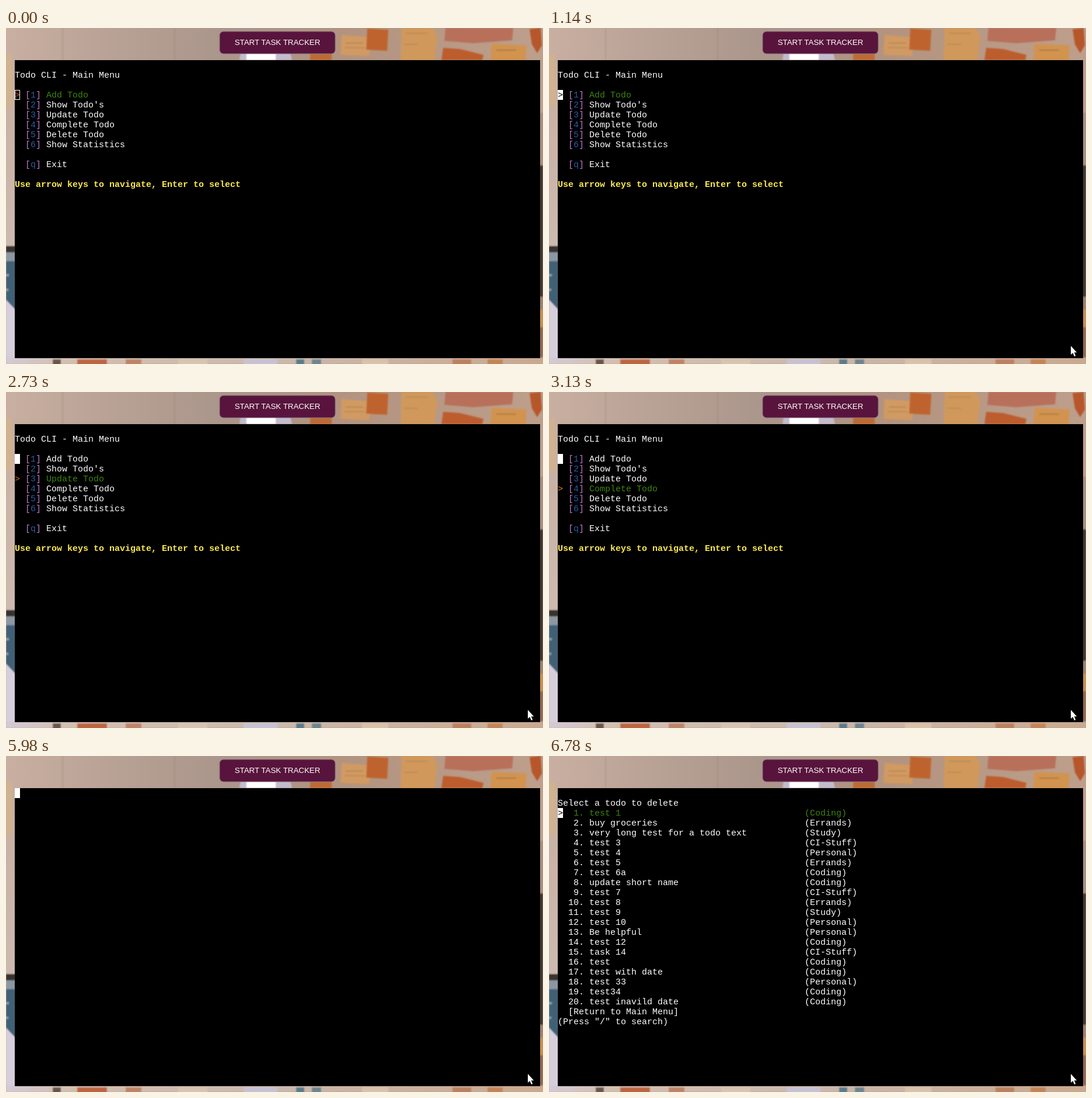
These frames come from a looping animation (920x575 px, 8 s). An HTML page:

```html
<!DOCTYPE html>
<html lang="en">
<head>
<meta charset="utf-8">
<title>Todo CLI</title>
<style>
html, body { margin: 0; width: 100%; height: 100%; overflow: hidden; background: #b6a093; }
svg { display: block; width: 920px; height: 575px; }
#term text { font: 15px "Liberation Mono", "Courier New", monospace; white-space: pre; fill: #fff; }
#term .hint { font-weight: 700; fill: #fce94f; }
#term .bracket { fill: #bd78c4; }
#term .key { fill: #2a5ba4; }
.label { font: 13.333px "Liberation Sans", Arial, sans-serif; fill: #fff; text-anchor: middle; }
</style>
</head>
<body>
<svg viewBox="0 0 920 575">
  <defs>
    <linearGradient id="wall">
      <stop offset="0" stop-color="#c8afa1"/>
      <stop offset=".2" stop-color="#b8a195"/>
      <stop offset=".4" stop-color="#ab968b"/>
      <stop offset=".62" stop-color="#b2937f"/>
      <stop offset="1" stop-color="#bd9f8c"/>
    </linearGradient>
    <linearGradient id="side" x2="0" y2="1">
      <stop offset="0" stop-color="#c7aea0"/>
      <stop offset="1" stop-color="#cdbab0"/>
    </linearGradient>
    <linearGradient id="desk">
      <stop offset="0" stop-color="#d3cad5"/>
      <stop offset=".12" stop-color="#d3bfb0"/>
      <stop offset=".5" stop-color="#cbb9ae"/>
      <stop offset="1" stop-color="#c9a98f"/>
    </linearGradient>
    <filter id="soft" x="0" y="0" width="920" height="575" filterUnits="userSpaceOnUse">
      <feGaussianBlur stdDeviation="1.1"/>
    </filter>
  </defs>
  <rect width="920" height="575" fill="url(#wall)"/>
  <g id="photo" filter="url(#soft)"></g>
  <rect x="366" y="6" width="198" height="38" rx="6.5" fill="#58143c" stroke="#806a7c"/>
  <text class="label" x="465" y="29">START TASK TRACKER</text>
  <g id="term">
    <rect x="15" y="55" width="900" height="510"/>
    <g id="menu"></g>
    <g id="list"></g>
    <rect id="cursor"/>
    <text id="mark">&gt;</text>
  </g>
  <circle id="click" cx="895" cy="543" r="12" fill="#808000"/>
  <path id="pointer" d="M0 0V15L3.4 12L6 18L8.2 17.1L5.7 11.2H10.2Z" fill="#fff"/>
</svg>
<script>
const LOOP = 8000, LEFT = 15, TOP = 55, CELL = 9, LINE = 17;
const GREEN = "#3e860c";
const $ = id => document.getElementById(id);
const show = (el, on) => el.setAttribute("visibility", on ? "visible" : "hidden");

function set(el, attrs) {
  for (const name in attrs) el.setAttribute(name, attrs[name]);
}

function add(parent, tag, attrs, text = "") {
  const el = document.createElementNS("http://www.w3.org/2000/svg", tag);
  set(el, attrs);
  el.textContent = text;
  parent.append(el);
  return el;
}

const at = (row, col) => ({ x: LEFT + col * CELL, y: TOP + row * LINE + 13 });
const print = (parent, row, col, text, cls = "") =>
  add(parent, "text", { ...at(row, col), class: cls }, text);

// Blurred room around the terminal
const patch = (x, y, width, height, fill) => add($("photo"), "rect", { x, y, width, height, fill });
const shape = (points, fill) => add($("photo"), "polygon", { points, fill });
const onDesk = (x, width, fill) => patch(x, 567, width, 12, fill);

function drawRoom() {
  patch(0, 50, 15, 330, "url(#side)");
  patch(96, 0, 2, 55, "#b19b8f");
  patch(288, 0, 2, 55, "#a59086");
  shape("404,30 484,30 490,55 400,55", "#c4bcce");
  patch(412, 40, 50, 15, "#fff");
  patch(521, 44, 37, 11, "#bd6a36");
  shape("575,12 626,16 622,48 573,46", "#d09a62");
  patch(582, 25, 30, 1.5, "#b5834f");
  patch(580, 33, 34, 1.5, "#b88752");
  shape("619,1 655,3 653,39 617,37", "#bf642d");
  shape("678,0 731,0 739,14 734,55 676,55", "#d1985c");
  patch(685, 8, 38, 1.5, "#b5864f");
  patch(682, 27, 24, 1.5, "#b8874f");
  shape("753,0 869,0 867,21 800,26 751,22", "#b8705a");
  shape("749,34 778,36 818,46 816,55 746,55", "#bd5d2e");
  shape("832,27 892,30 890,55 830,55", "#d2934f");
  patch(840, 37, 34, 1.5, "#a2703f");
  shape("897,2 916,0 918,30 910,43 901,28", "#b6562c");

  patch(0, 45, 10, 90, "#d0b28e");
  patch(0, 373, 16, 11, "#37322e");
  patch(0, 384, 16, 15, "#8b97a2");
  patch(0, 399, 16, 90, "#3f6076");
  patch(0, 421, 5, 4, "#8d9ba5");
  patch(0, 446, 4, 4, "#8d9ba5");
  shape("0,465 16,482 16,575 0,575", "#d6cfdb");

  patch(914, 145, 6, 90, "#a68d80");
  patch(914, 235, 6, 225, "#3c342f");
  patch(914, 460, 6, 22, "#9b806c");
  patch(914, 482, 6, 30, "#c68f4a");
  patch(914, 512, 6, 63, "#8d6650");

  patch(0, 564, 920, 11, "url(#desk)");
  onDesk(80, 14, "#6b554a");
  onDesk(122, 51, "#bd6540");
  onDesk(205, 27, "#bf8468");
  onDesk(295, 50, "#d8c4b0");
  onDesk(407, 58, "#c6c2d3");
  onDesk(497, 14, "#587c8b");
  onDesk(524, 16, "#6c858e");
  onDesk(610, 45, "#d9c2ab");
  onDesk(765, 32, "#bb805f");
  onDesk(825, 26, "#c38558");
}

const menuItems = ["Add Todo", "Show Todo's", "Update Todo", "Complete Todo", "Delete Todo", "Show Statistics"];
let menuLabels;

function menuLine(row, key, label) {
  print($("menu"), row, 2, "[", "bracket");
  print($("menu"), row, 3, key, "key");
  print($("menu"), row, 4, "]", "bracket");
  return print($("menu"), row, 6, label);
}

function drawMenu() {
  print($("menu"), 1, 0, "Todo CLI - Main Menu");
  menuLabels = menuItems.map((label, i) => menuLine(3 + i, i + 1, label));
  menuLine(10, "q", "Exit");
  print($("menu"), 12, 0, "Use arrow keys to navigate, Enter to select", "hint");
}

const todos = `test 1|Coding
buy groceries|Errands
very long test for a todo text|Study
test 3|CI-Stuff
test 4|Personal
test 5|Errands
test 6a|Coding
update short name|Coding
test 7|CI-Stuff
test 8|Errands
test 9|Study
test 10|Personal
Be helpful|Personal
test 12|Coding
task 14|CI-Stuff
test|Coding
test with date|Coding
test 33|Personal
test34|Coding
test inavild date|Coding`.split("\n");

function drawList() {
  const list = $("list");
  print(list, 1, 0, "Select a todo to delete");
  todos.forEach((todo, i) => {
    const [name, group] = todo.split("|");
    const left = print(list, 2 + i, 2, `${i + 1}. `.padStart(4) + name);
    const right = print(list, 2 + i, 47, `(${group})`);
    if (i === 0) left.style.fill = right.style.fill = GREEN;
  });
  print(list, 22, 2, "[Return to Main Menu]");
  print(list, 23, 0, '(Press "/" to search)');
}

// Each step holds until the next one starts
const current = (steps, t) => steps.filter(s => s[0] <= t).pop();
const picks = [
  [0, 0, "#d3482f"], [2200, 1, "#78503f"], [2730, 2, "#d9652a"],
  [3130, 3, "#e87d17"], [4520, 4, "#d23a2c"]
];
const moves = [
  [0, 940, 600], [260, 876, 562], [330, 888, 550], [400, 895, 545],
  [730, 896, 545], [990, 895, 545], [1140, 894, 544]
];
const CLICK = 730, CLEAR = 5980, LIST = 6710;

function setCursor(row, filled) {
  const inset = filled ? 0 : 0.5;
  set($("cursor"), {
    x: LEFT + inset, y: TOP + row * LINE + inset,
    width: CELL - 2 * inset, height: LINE - 2 * inset,
    fill: filled ? "#fff" : "none", stroke: filled ? "none" : "#fff"
  });
}

function setMark(row, color) {
  set($("mark"), at(row, 0));
  $("mark").style.fill = color;
}

function render(t) {
  const inMenu = t < CLEAR, inList = t >= LIST, focused = t >= CLICK;
  const [, pick, color] = current(picks, t);
  const [, px, py] = current(moves, t);

  show($("menu"), inMenu);
  show($("list"), inList);
  show($("mark"), inMenu || inList);
  menuLabels.forEach((el, i) => el.style.fill = i === pick ? GREEN : "");

  setCursor(inMenu ? 3 : inList ? 2 : 0, focused);
  if (inList) setMark(2, "#000");
  else setMark(3 + pick, focused && pick === 0 ? "#000" : color);

  show($("click"), t >= CLICK && t < 990);
  set($("click"), { opacity: t < 860 ? 1 : 0.5 });
  set($("pointer"), { transform: `translate(${px} ${py})` });
}

drawRoom();
drawMenu();
drawList();
const start = performance.now();
function tick() {
  render((performance.now() - start) % LOOP);
  requestAnimationFrame(tick);
}
tick();
</script>
</body>
</html>
```
